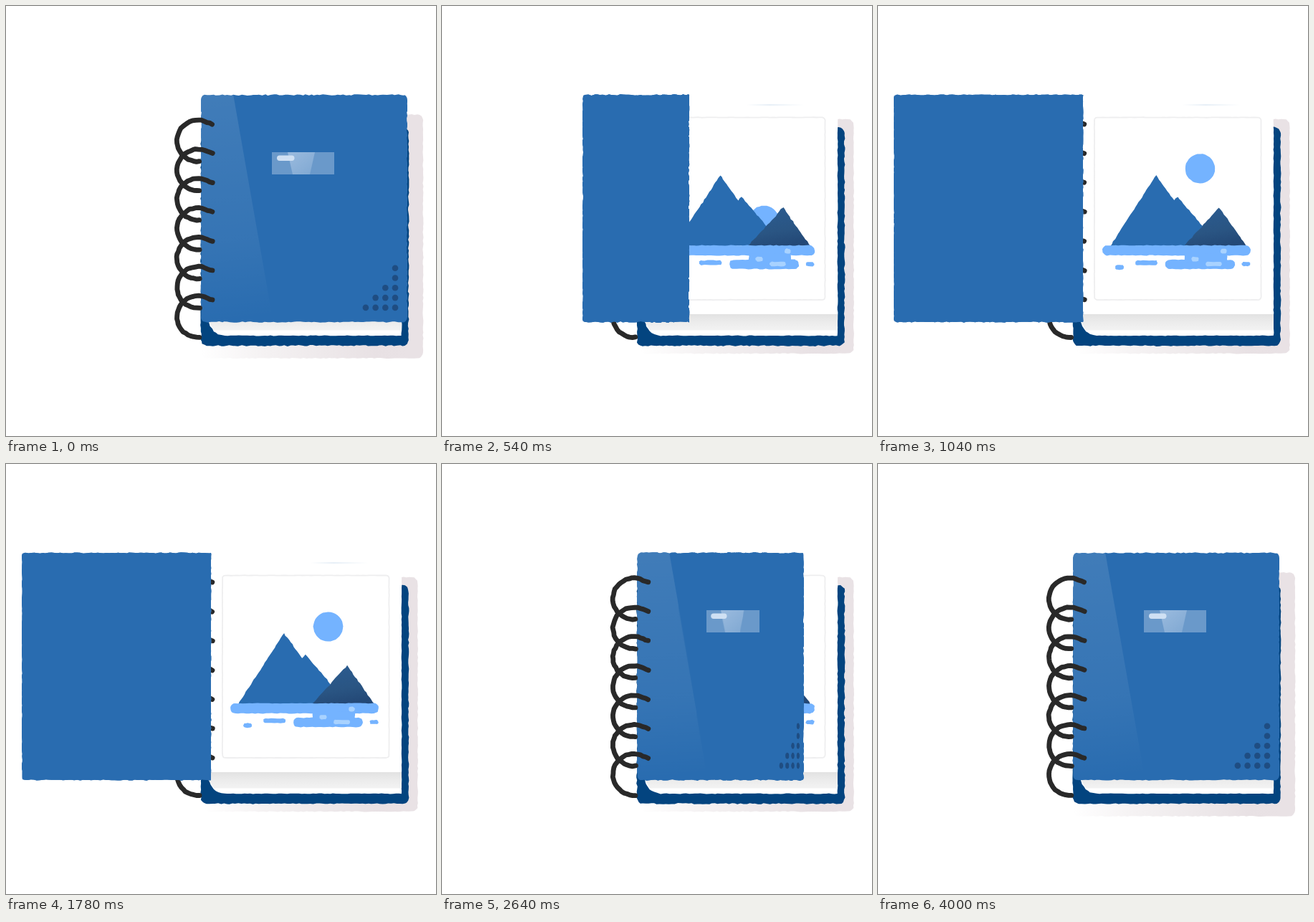
These frames come from a looping animation (600x600 px, 4020 ms). An HTML page with a canvas:

```html
<!DOCTYPE html>
<html>
<head>
<meta charset="utf-8">
<style>
html, body { margin: 0; width: 100%; height: 100%; overflow: hidden; background: #fff; }
canvas { display: block; width: 600px; height: 600px; }
</style>
</head>
<body>
<canvas id="stage" width="600" height="600"></canvas>
<script>
const g = document.getElementById('stage').getContext('2d');
const LOOP = 4020, SPINE = 272, WIDTH = 288, TOP = 124, BOTTOM = 441;
const BLUE = '#296cb0', SKY = '#74b3ff', MAX_BEND = 20.57;

const ease = s => (1 - Math.cos(Math.PI * Math.min(1, Math.max(0, s)))) / 2;
const mix = (a, b, k) => a + (b - a) * k;
const ramp = (t, start, length) => ease((t - start) / length);

// Hand-drawn wobble: random offsets blended between keys 60 ms apart.
let clock = 0;
const rand = (a, b, c) => {
  const v = Math.sin(a * 127.1 + b * 311.7 + c * 74.7) * 43758.5453;
  return (v - Math.floor(v)) * 2 - 1;
};
function wobble(seed, i) {
  const k = clock / 60, a = Math.floor(k);
  return mix(rand(seed, i, a % 67), rand(seed, i, (a + 1) % 67), k - a);
}

function roughPath(pts, seed, amp, closed = true) {
  const out = [];
  const n = closed ? pts.length : pts.length - 1;
  for (let i = 0; i < n; i++) {
    const [x, y] = pts[i], [u, v] = pts[(i + 1) % pts.length];
    const steps = Math.max(1, Math.round(Math.hypot(u - x, v - y) / 4));
    for (let k = 0; k < steps; k++) out.push([mix(x, u, k / steps), mix(y, v, k / steps)]);
  }
  if (!closed) out.push(pts[pts.length - 1]);
  g.beginPath();
  out.forEach(([x, y], i) =>
    g.lineTo(x + amp * wobble(seed, i), y + amp * wobble(seed + 0.5, i)));
  if (closed) g.closePath();
}

function blob(pts, fill, seed, amp = 0.7) {
  roughPath(pts, seed, amp);
  g.fillStyle = fill;
  g.fill();
}

function arcPts(cx, cy, r, from, to, n) {
  return Array.from({ length: n + 1 }, (_, i) => {
    const a = mix(from, to, i / n);
    return [cx + r * Math.cos(a), cy + r * Math.sin(a)];
  });
}

function box(l, t, r, b, rad) {
  const q = Math.PI / 2;
  return [
    ...arcPts(l + rad, t + rad, rad, 2 * q, 3 * q, 4),
    ...arcPts(r - rad, t + rad, rad, 3 * q, 4 * q, 4),
    ...arcPts(r - rad, b - rad, rad, 0, q, 4),
    ...arcPts(l + rad, b - rad, rad, q, 2 * q, 4)
  ];
}

function gradient(c, x0, y0, x1, y1, ...stops) {
  const f = c.createLinearGradient(x0, y0, x1, y1);
  stops.forEach(([p, col]) => f.addColorStop(p, col));
  return f;
}

// Flat cover artwork, later bent strip by strip.
function makeCover(decorated) {
  const cv = document.createElement('canvas');
  cv.width = WIDTH;
  cv.height = 600;
  const c = cv.getContext('2d');
  c.translate(-SPINE, 0);
  c.fillStyle = BLUE;
  c.beginPath();
  c.roundRect(SPINE, TOP - 1, WIDTH, BOTTOM - TOP + 2, 8);
  c.fill();
  if (!decorated) return cv;

  const poly = (fill, ...p) => {
    c.fillStyle = fill;
    c.beginPath();
    p.forEach(q => c.lineTo(q[0], q[1]));
    c.fill();
  };
  c.save();
  c.clip();
  poly(gradient(c, 290, 124, 330, 438, [0, 'rgba(255,255,255,.11)'],
    [0.65, 'rgba(255,255,255,.06)'], [1, 'rgba(255,255,255,0)']),
    [272, 123], [317, 123], [373, 442], [272, 442]);
  c.restore();

  c.fillStyle = '#6a99ca';
  c.fillRect(371, 204, 87, 31);
  poly(gradient(c, 400, 204, 425, 236, [0, '#98b9dd'], [1, '#81a9d3']),
    [393, 204], [431, 204], [424, 235], [400, 235]);
  c.fillStyle = '#cfe0f3';
  c.beginPath();
  c.roundRect(378, 208.5, 24.5, 7.5, 3.7);
  c.fill();

  c.fillStyle = '#1f4d82';
  [1, 1, 2, 3, 4].forEach((n, row) => {
    for (let i = 0; i < n; i++) {
      c.beginPath();
      c.arc(543 - 13.7 * i, 365.7 + 13.8 * row, 4.3, 0, 7);
      c.fill();
    }
  });
  return cv;
}
const front = makeCover(true), plain = makeCover(false);

function drawCover(bend, closing) {
  const R = WIDTH / Math.max(bend, 0.001);
  const c = Math.min(1, closing ? 0.6 + 0.003 * R : 0.85 + 0.0011 * R);
  const arc = c * Math.PI * R;
  const at = u => SPINE + (u < arc ? R * Math.sin(u / (c * R)) : arc - u);
  const end = at(WIDTH);
  const fold = WIDTH > arc / 2 ? SPINE + R : end;
  const art = closing || bend < 0.01 ? front : plain;

  g.save();
  roughPath(box(Math.min(SPINE, end), TOP, fold, BOTTOM, 1), 3, 0.9);
  g.clip();
  if (bend < 0.01) {
    g.drawImage(front, SPINE, 0);
  } else {
    for (let u = 0; u < WIDTH; u++) {
      const a = at(u), b = at(u + 1);
      const src = a < b ? front : art;
      const over = u < WIDTH - 1 ? 0.7 : 0;
      g.drawImage(src, u, 0, 1, 600,
        Math.min(a, b) - (a > b ? over : 0), 0, Math.abs(b - a) + over, 600);
    }
  }
  g.restore();
}

function drawRings() {
  g.strokeStyle = '#292929';
  g.lineWidth = 6.8;
  g.lineJoin = 'round';
  g.lineCap = 'round';
  for (let i = 0; i < 7; i++) {
    const y = 188 + 40.9 * i;
    const pts = [[288, 164.8 + 40.9 * i], ...arcPts(267.5, y, 29, -1.1, -4.8, 26)];
    roughPath(pts, 40 + i, 0.5, false);
    g.stroke();
  }
}

function drawShadow(k) {
  const l = mix(276, 272, k), t = mix(158, 151.5, k);
  const r = mix(574.5, 582, k), b = mix(485, 491.5, k);
  const fill = gradient(g, l, 0, 560, 0, [0, 'rgba(232,225,228,0)'],
    [0.3, 'rgba(232,226,228,.45)'], [0.85, '#e8e1e4'], [1, '#e9e2e5']);
  const saved = clock;
  clock = 0; // the shadow edge does not wobble
  blob(box(l, t, r, b, 8), fill, 1, 0.6);
  clock = saved;
}

function drawPages() {
  blob(box(SPINE, 169, 561.7, 474, 8), '#03447f', 2, 0.9);

  const curl = [[283, 441], [285, 447], [290, 454], [296, 458], [305, 460]];
  blob([[283, 137], [552, 137], [552, 460], ...curl.reverse()], '#fff', 5, 0.5);

  g.fillStyle = gradient(g, 0, 430, 0, 453, [0, '#e2e2e2'], [0.5, '#ececec'], [1, '#f3f3f3']);
  g.beginPath();
  g.moveTo(284, 430);
  g.lineTo(552, 430);
  g.lineTo(552, 452.5);
  g.lineTo(290, 452.5);
  g.lineTo(284, 442);
  g.fill();

  g.fillStyle = gradient(g, 425, 0, 505, 0, [0, '#fff'], [0.4, '#dce8f3'], [1, '#fff']);
  g.fillRect(425, 137.3, 80, 1.4);

  roughPath(box(302, 155.5, 534.5, 410, 4), 6, 0.25);
  g.strokeStyle = '#eeeeef';
  g.lineWidth = 1.8;
  g.stroke();
}

function drawScene(sunY) {
  g.save();
  g.beginPath();
  g.rect(302, 156, 233, 184);
  g.clip();
  blob(arcPts(449.5, sunY, 20.7, 0, Math.PI * 2, 36), SKY, 10, 0.4);
  g.restore();

  blob([[388, 236], [413, 271], [418, 266], [453, 307], [477, 335], [324, 335]], BLUE, 11);
  blob([[476, 281], [514, 335], [427, 335]],
    gradient(g, 465, 281, 475, 335, [0, '#2b5b8f'], [0.6, '#2a5583'], [1, '#234876']), 12);

  const bars = [
    [313, 334, 520, 348, 6.5], [401, 354, 498, 367, 6], [428, 345, 487, 358, 1],
    [331, 361.5, 343, 368, 3], [359, 355, 390, 361.5, 3], [507.5, 357, 519.5, 363, 3]
  ];
  bars.forEach(([l, t, r, b, q], i) => blob(box(l, t, r, b, q), SKY, 14 + i, 0.6));
  const glints = [[437.5, 350, 447.5, 356.5], [457, 357, 480, 363], [478, 338.5, 486.5, 345.5]];
  glints.forEach(([l, t, r, b], i) => blob(box(l, t, r, b, 3), '#a8d2ff', 24 + i, 0.5));
}

function draw(t) {
  clock = t;
  g.fillStyle = '#fff';
  g.fillRect(0, 0, 600, 600);

  const closing = t >= 2343;
  const bend = MAX_BEND * (ramp(t, 439, 349) - ramp(t, 2343, 349));
  drawShadow(1 - ramp(t, 220, 220) + ramp(t, 2715, 220));
  drawPages();
  drawScene(mix(330, 227, ramp(t, 400, 380)));

  // Past this bend the cover's free edge crosses the binding.
  if (bend > 2.8) {
    drawRings();
    drawCover(bend, closing);
  } else {
    drawCover(bend, closing);
    drawRings();
  }
}

const started = performance.now();
function frame() {
  const t = (performance.now() - started) % LOOP;
  draw(Math.floor(t / 20) * 20);
  requestAnimationFrame(frame);
}
frame();
</script>
</body>
</html>
```
